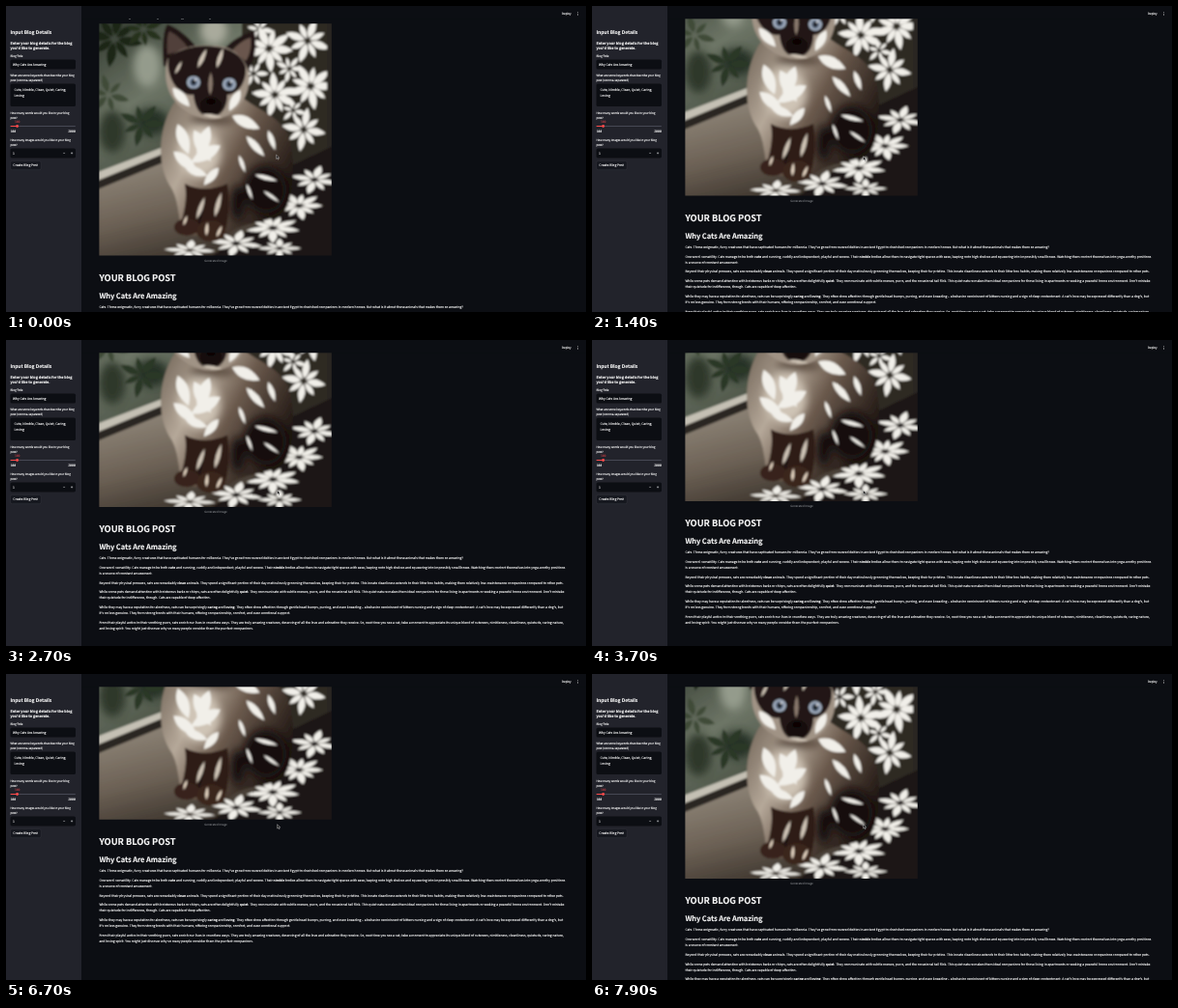
An HTML page that plays this animation: 600x317 px, repeating every 8000 ms.

```html
<!DOCTYPE html>
<html lang="en">
<head>
<meta charset="utf-8">
<title>Blog generator</title>
<style>
html, body { margin: 0; width: 100%; height: 100%; overflow: hidden; background: #0c0e13; }
svg { display: block; width: 600px; height: 317px; }
text {
  font: 3.375px "Noto Sans CJK SC", "Noto Sans CJK JP", "Noto Sans", sans-serif;
  fill: #fafafa; stroke: #fafafa; stroke-width: .1px; text-rendering: geometricPrecision;
}
.label { font-size: 2.953px; }
.mono { font: 3.28px "Noto Sans Mono", "DejaVu Sans Mono", monospace; }
.caption { font-size: 2.953px; fill: #a3a5a9; stroke: none; text-anchor: middle; }
.h1 { font-size: 9.3px; font-weight: 700; letter-spacing: -.005em; }
.h2 { font-size: 7.55px; font-weight: 700; letter-spacing: -.012em; }
.h3 { font-size: 5.036px; font-weight: 700; letter-spacing: -.01em; }
.h5 { font-size: 3.777px; font-weight: 700; }
.b { font-weight: 700; }
.box { fill: #0c0e13; }
</style>
</head>
<body>
<svg viewBox="0 0 600 317">
  <defs>
    <clipPath id="frame"><rect x="96.4" y="18.2" width="240.4" height="240.2"/></clipPath>
    <filter id="soft" x="-5%" y="-5%" width="110%" height="110%"><feGaussianBlur stdDeviation=".8"/></filter>
    <filter id="hazy" x="-20%" y="-20%" width="140%" height="140%"><feGaussianBlur stdDeviation="4"/></filter>
    <linearGradient id="garden" x1="0" y1="0" x2=".6" y2="1">
      <stop offset="0" stop-color="#2b3329"/><stop offset=".5" stop-color="#6d7566"/><stop offset="1" stop-color="#3a4236"/>
    </linearGradient>
    <linearGradient id="sill" x1="0" y1="0" x2=".6" y2="1">
      <stop offset="0" stop-color="#968d80"/><stop offset=".5" stop-color="#6c6155"/><stop offset="1" stop-color="#2c251f"/>
    </linearGradient>
    <linearGradient id="fur" x1="0" y1="0" x2="1" y2=".55">
      <stop offset="0" stop-color="#6f6255"/><stop offset=".35" stop-color="#b5a899"/>
      <stop offset=".6" stop-color="#6b5a4d"/><stop offset="1" stop-color="#1f1612"/>
    </linearGradient>
  </defs>

  <g id="page">
    <path d="M127 13h2v.9h-2zM156 13h2v1h-2zM181 13h3v.9h-3zM210 13h2v.9h-2z" fill="#6d6f73"/>
    <g clip-path="url(#frame)"><g id="photo" filter="url(#soft)"></g></g>
    <text class="caption" x="217" y="264.5">Generated Image</text>
    <text class="h1" x="96.4" y="284.6">YOUR BLOG POST</text>
    <text class="h2" x="96.4" y="302.6">Why Cats Are Amazing</text>
    <g id="post"></g>
  </g>

  <rect x="78" width="522" height="13.3" fill="#0c0e13"/>
  <text class="label" x="575" y="9.2">Deploy</text>
  <g fill="#fafafa"><circle cx="591.5" cy="6.8" r=".45"/><circle cx="591.5" cy="8.2" r=".45"/><circle cx="591.5" cy="9.6" r=".45"/></g>

  <rect width="78" height="317" fill="#22232b"/>
  <text class="h3" x="4.4" y="28.5">Input Blog Details</text>
  <text class="h5" x="4.4" y="39.6">Enter your blog details for the blog</text>
  <text class="h5" x="4.4" y="44.8">you'd like to generate.</text>
  <text class="label" x="4.4" y="53.2">Blog Title</text>
  <rect class="box" x="4.5" y="55.6" width="67.5" height="10" rx="1.6"/>
  <text x="6.9" y="61.9">Why Cats Are Amazing</text>
  <text class="label" x="4.4" y="72.9">What are some keywords that describe your blog</text>
  <text class="label" x="4.4" y="77.8">post (comma-separated)</text>
  <rect class="box" x="4.5" y="80.4" width="67.5" height="23.6" rx="1.6"/>
  <text x="8.4" y="88.2">Cute, Nimble, Clean, Quiet, Caring,</text>
  <text x="8.4" y="94">Loving</text>
  <text class="label" x="4.4" y="112">How many words would you like in your blog</text>
  <text class="label" x="4.4" y="116.9">post?</text>
  <text class="mono" x="8.7" y="121.3" style="fill:#d94348;stroke:none">300</text>
  <rect x="4.5" y="124.1" width="67.5" height=".9" rx=".4" fill="#464954"/>
  <rect x="4.5" y="124.1" width="7.1" height=".9" rx=".4" fill="#ff4b4b"/>
  <circle cx="11.6" cy="124.5" r="1.4" fill="#ff4b4b"/>
  <text class="mono" x="4.4" y="130.6">100</text>
  <text class="mono" x="72" y="130.6" text-anchor="end">2000</text>
  <text class="label" x="4.4" y="140">How many images would you like in your blog</text>
  <text class="label" x="4.4" y="144.9">post?</text>
  <rect class="box" x="4.5" y="147.4" width="67.5" height="10" rx="1.6"/>
  <text x="6.9" y="153.7">1</text>
  <path d="M59.2 152.4h1.9M67 152.4h2.2M68.1 151.3v2.2" stroke="#d5d6d9" stroke-width=".5"/>
  <rect x="4.6" y="160.6" width="31.6" height="9.1" rx="1.7" fill="#16181f" stroke="#4d4f57" stroke-width=".25"/>
  <text x="7.3" y="166.4">Create Blog Post</text>

  <path id="cursor" d="M0 0v4.2l1-.9.7 1.6.8-.4-.7-1.5h1.3z" fill="#111" stroke="#eee" stroke-width=".4"/>
</svg>

<script>
const LOOP = 8000;
const $ = id => document.getElementById(id);

// Each paragraph is a list of lines; asterisks mark bold words.
const paragraphs = [
  ["Cats. Those enigmatic, furry creatures that have captivated humans for millennia. They've gone from revered deities in ancient Egypt to cherished companions in modern homes. But what is it about these animals that makes them so amazing?"],
  ["One word: versatility. Cats manage to be both *cute* and cunning, cuddly and independent, playful and serene. Their *nimble* bodies allow them to navigate tight spaces with ease, leaping onto high shelves and squeezing into impossibly small boxes. Watching them contort themselves into yoga-worthy positions",
   "is a source of constant amusement."],
  ["Beyond their physical prowess, cats are remarkably *clean* animals. They spend a significant portion of their day meticulously grooming themselves, keeping their fur pristine. This innate cleanliness extends to their litter box habits, making them relatively low-maintenance companions compared to other pets."],
  ["While some pets demand attention with boisterous barks or chirps, cats are often delightfully *quiet*. They communicate with subtle meows, purrs, and the occasional tail flick. This quiet nature makes them ideal companions for those living in apartments or seeking a peaceful home environment. Don't mistake",
   "their quietude for indifference, though. Cats are capable of deep affection."],
  ["While they may have a reputation for aloofness, cats can be surprisingly *caring* and *loving*. They often show affection through gentle head bumps, purring, and even kneading – a behavior reminiscent of kittens nursing and a sign of deep contentment. A cat's love may be expressed differently than a dog's, but",
   "it's no less genuine. They form strong bonds with their humans, offering companionship, comfort, and even emotional support."],
  ["From their playful antics to their soothing purrs, cats enrich our lives in countless ways. They are truly amazing creatures, deserving of all the love and adoration they receive. So, next time you see a cat, take a moment to appreciate its unique blend of cuteness, nimbleness, cleanliness, quietude, caring nature,",
   "and loving spirit. You might just discover why so many people consider them the purrfect companions."]
];

let y = 312.7, post = "";
for (const lines of paragraphs) {
  for (const line of lines) {
    post += `<text x="96.4" y="${y}">${line.replace(/\*(.+?)\*/g, '<tspan class="b">$1</tspan>')}</text>`;
    y += 6;
  }
  y += 3.75;
}
$("post").innerHTML = post;

// Photo: a cat on a window sill in dappled light.
const shape = (d, fill) => `<path d="${d}" fill="${fill}"/>`;
const oval = (x, y, rx, ry, fill) => `<ellipse cx="${x}" cy="${y}" rx="${rx}" ry="${ry}" fill="${fill}"/>`;
const hazy = parts => `<g filter="url(#hazy)">${parts}</g>`;
const leaf = (x, y, len, deg, fill, w = .32) =>
  `<path transform="translate(${x} ${y}) rotate(${deg}) scale(${len})" d="M.12 0Q.5 ${-w} 1 0Q.5 ${w} .12 0" fill="${fill}"/>`;
const burst = (x, y, r, n, turn, fill, flat = 1) =>
  `<g transform="translate(${x} ${y}) scale(1 ${flat})">` +
  Array.from({ length: n }, (_, i) => leaf(0, 0, r * (i % 2 ? .8 : 1), turn + i * 360 / n, fill)).join("") + "</g>";
const light = "#f1efe9", cream = "#cfc4b6", brown = "#211713", dark = "#120d0b";

$("photo").innerHTML = [
  shape("M90 10H345V265H90Z", "#3b362f"),
  shape("M90 10H250V130L165 150 90 180Z", "url(#garden)"),
  hazy(oval(146, 62, 14, 22, "#949b8c") + oval(110, 130, 14, 22, "#2d3829") + oval(150, 120, 18, 14, "#283125") + oval(215, 25, 14, 16, "#a9aa9c")),
  burst(112, 34, 30, 8, 10, "#1d2719"),
  burst(142, 24, 22, 7, 30, "#25301f"),
  burst(106, 92, 22, 6, 15, "#3f4b38"),
  burst(140, 122, 24, 7, 0, "#2c3828"),
  shape("M90 174L168 144V151L90 183Z", "#c4c0b4"),
  shape("M90 183L168 151V160L90 192Z", "#2b2621"),
  shape("M90 192L168 160H345V265H90Z", "url(#sill)"),
  shape("M244 10H345V175L290 198 244 160Z", "#2f2a24"),
  burst(272, 44, 25, 9, 5, light), burst(312, 36, 24, 8, 20, light),
  burst(315, 83, 25, 9, 0, light), burst(278, 92, 24, 9, 25, light),
  burst(308, 128, 23, 8, 10, light), burst(256, 70, 16, 6, 0, light),
  burst(293, 65, 15, 7, 0, light), burst(297, 108, 14, 6, 15, light), burst(262, 24, 16, 6, 10, light),
  shape("M332 10H345V160H332Z", "#2b2823"),
  shape("M345 142L296 165 288 206 205 265H345Z", "#1f1914"),
  burst(319, 180, 25, 8, 15, light, .6), burst(303, 207, 25, 9, 0, light, .6),
  burst(276, 230, 28, 9, 10, light, .55), burst(238, 246, 28, 8, 12, light, .5),
  burst(190, 253, 27, 8, 5, light, .4), burst(283, 251, 23, 8, 0, light, .45),
  // Body, haunch and legs
  shape("M174 100C158 125 154 165 172 190C180 206 178 226 184 238L230 236C246 222 272 226 288 213C300 190 299 152 291 132C280 113 262 108 246 96Z", "url(#fur)"),
  hazy(oval(268, 190, 22, 25, dark) + oval(240, 204, 8, 18, dark) + oval(200, 152, 22, 26, cream) + oval(214, 118, 24, 5, "#4f4036")),
  shape("M185 184C200 192 216 190 229 184C232 206 230 222 226 236L180 230C184 214 188 200 185 184Z", "#2e1e17"),
  oval(187, 229, 13, 9, "#38241b"), oval(212, 233, 15, 11, "#3a251c"),
  leaf(204, 196, 30, 98, dark, .12),
  leaf(183, 229, 13, -70, "#e9d9c6", .2), leaf(207, 240, 16, -85, "#e9d9c6", .2),
  leaf(217, 241, 15, -65, "#e9d9c6", .2), leaf(196, 224, 28, -70, cream, .16), leaf(215, 222, 30, -75, cream, .16),
  // Dappled light on the coat
  leaf(176, 118, 38, 70, light), leaf(192, 124, 42, 62, light), leaf(170, 148, 36, 40, light),
  leaf(212, 120, 40, 110, light), leaf(226, 142, 40, 150, light), leaf(230, 112, 36, 25, light),
  leaf(182, 166, 28, 20, light), leaf(222, 165, 27, 130, light), leaf(246, 132, 32, 48, light, .24),
  leaf(270, 126, 25, 70, light, .24), leaf(240, 152, 22, 70, light, .2),
  leaf(254, 174, 28, 15, light, .16), leaf(264, 190, 23, 35, light, .14), leaf(248, 182, 20, 70, light, .16),
  // Ears and head
  shape("M163 63C161 40 163 24 167 19C178 23 190 33 199 45Z", brown),
  shape("M167 50C166 38 167 30 169 26C177 30 184 37 189 44Z", "#51413a"),
  shape("M225 45C234 35 247 28 257 26C260 42 257 57 250 68Z", brown),
  shape("M234 46C241 38 248 34 253 33C254 43 252 51 248 57Z", "#6a574e"),
  shape("M167 55C178 43 198 39 213 41C230 40 246 50 251 68C254 88 244 105 230 113C218 120 199 118 187 109C170 100 161 78 167 55Z", "#a09385"),
  shape("M168 53C184 42 202 40 216 42C232 43 244 51 248 63C249 77 242 91 229 92C229 106 222 115 211 115C200 114 195 104 194 92C179 94 165 75 168 53Z", brown),
  leaf(170, 82, 30, 48, light), leaf(244, 84, 28, 118, light), leaf(197, 67, 25, -65, cream, .18),
  leaf(217, 67, 25, -72, cream, .18), leaf(174, 72, 17, -62, cream, .18), leaf(211, 96, 28, -88, "#8a7a6e", .16),
  oval(212, 103, 11, 9, dark), oval(212, 99, 5, 3, "#080606"), leaf(200, 112, 24, 8, cream, .14),
  ...[[194, 79], [231, 81]].map(([x, y]) =>
    oval(x, y, 8.4, 7.8, dark) + oval(x, y, 7, 6.6, "#a3afc0") + oval(x, y, 4.3, 4.6, "#67758a") +
    oval(x, y, 2.3, 2.8, "#151a22") + oval(x + 2, y - 2.5, 1, 1, "#fff"))
].join("");

// Scroll offset over time: [ms, px]
const scroll = [[0, 0], [900, 42.1], [1800, 73.4], [2700, 85.5], [3600, 91.5],
  [5300, 91.5], [6300, 107.6], [7200, 107.6], [7900, 46.4], [LOOP, 36]];

const rate = i => (scroll[i + 1][1] - scroll[i][1]) / (scroll[i + 1][0] - scroll[i][0]);

// Speed at a key: harmonic mean of both sides, zero where the page rests or turns.
function speed(i) {
  if (i === 0) return rate(0);
  if (i === scroll.length - 1) return rate(i - 1);
  const a = rate(i - 1), b = rate(i);
  return a * b > 0 ? 2 * a * b / (a + b) : 0;
}

function offset(t) {
  const i = scroll.findIndex(k => k[0] > t) - 1;
  const [t0, a] = scroll[i], [t1, b] = scroll[i + 1];
  const d = t1 - t0, u = (t - t0) / d, v = 1 - u;
  return v * v * (1 + 2 * u) * a + u * u * (1 + 2 * v) * b + d * u * v * (v * speed(i) - u * speed(i + 1));
}

function draw(now) {
  const t = Math.floor(now % LOOP / 100) * 100;
  const move = Math.min(t / 900, 1);
  $("page").setAttribute("transform", `translate(0 ${-offset(t)})`);
  $("cursor").setAttribute("transform", `translate(${279.6 + move} ${154.2 + 1.6 * move})`);
  requestAnimationFrame(draw);
}
draw(0);
</script>
</body>
</html>
```
